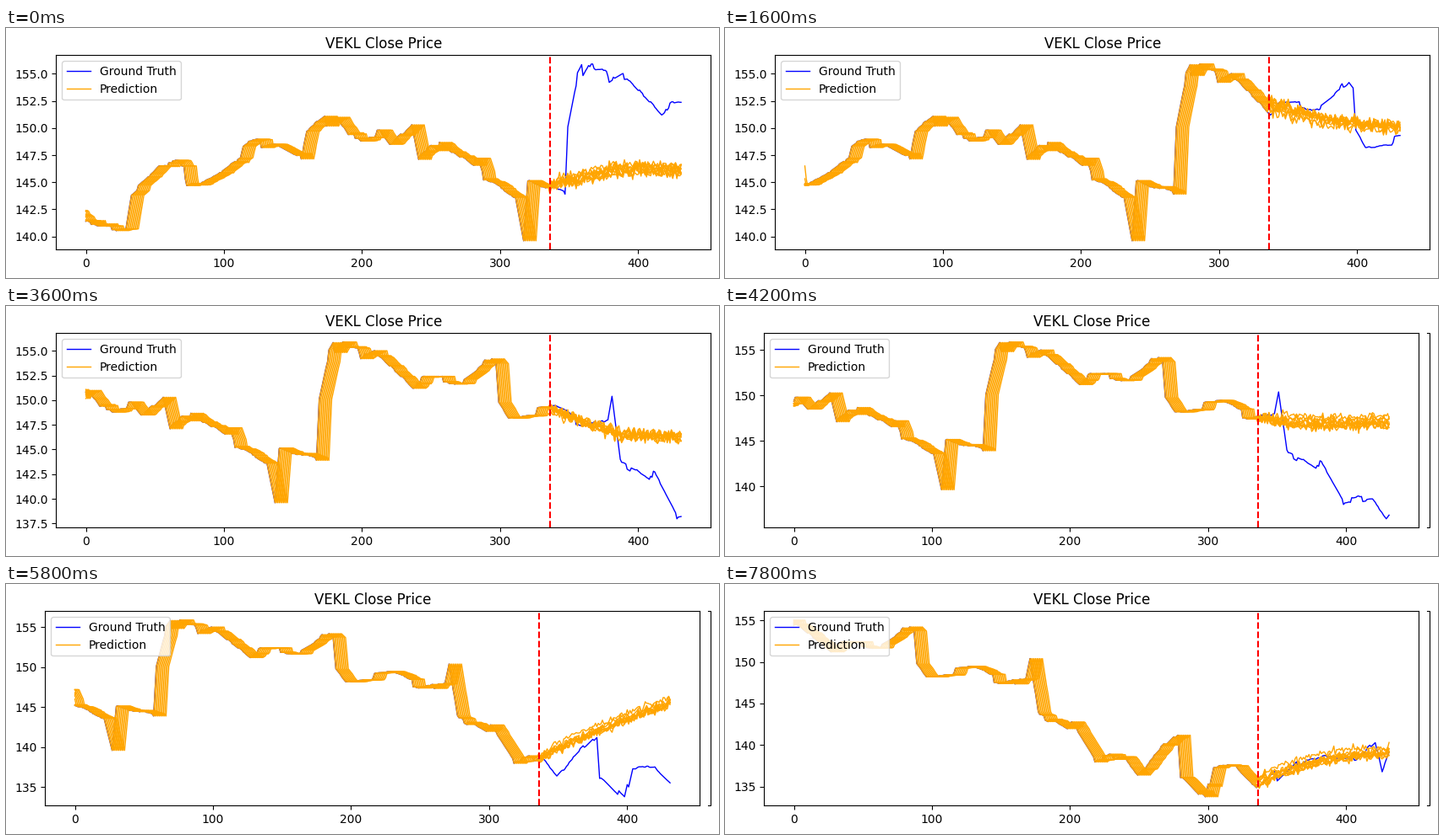
These frames come from a looping animation (844 px wide and 297 px high, 8000 ms). A matplotlib script:

```python
import numpy as np
import matplotlib.pyplot as plt
from matplotlib.animation import FuncAnimation
from matplotlib.lines import Line2D

W, H, DPI = 844, 297, 100
FRAMES, INTERVAL = 40, 200
STEP = 10                  # samples scrolled per frame, and windows drawn
PAST, AHEAD = 336, 96
LEFT, BOTTOM, WIDTH, HEIGHT = 59.3, 33.7, 775, 231
SHRINK = 13                # left shift once tick labels lose their decimals

# Main turning points of the price as (sample, value)
TURNS = np.array([
    (-9, 142.3), (8, 141.0), (29, 140.7), (33, 143.8), (53, 146.5),
    (71, 146.5), (73, 144.7), (95, 145.7), (116, 148.5), (137, 148.5),
    (155, 147.6), (160, 149.7), (182, 151.0), (190, 149.4), (213, 149.8),
    (220, 148.5), (236, 150.3), (241, 147.1), (250, 148.4), (284, 147.2),
    (288, 145.2), (311, 143.7), (317, 139.6), (320, 145.1), (347, 143.9),
    (349, 150.1), (356, 155.1), (366, 155.9), (378, 154.8), (391, 154.5),
    (417, 151.2), (424, 152.4), (454, 152.1), (474, 154.2), (477, 153.7),
    (479, 149.8), (486, 148.2), (521, 149.4), (539, 147.4), (558, 148.0),
    (561, 150.4), (567, 144.0), (591, 142.8), (607, 138.6), (629, 138.6),
    (639, 136.4), (668, 141.2), (670, 136.1), (688, 133.8), (694, 137.3),
    (711, 137.3), (725, 134.9), (761, 138.2), (797, 138.2), (811, 140.3),
    (816, 136.8), (821, 139.2),
])

# Forecast drift: final rise and mid-way bulge, eased between key frames
KEYS = [0, 8, 14, 21, 25, 33, 39]
RISE = [1.5, -2.0, -6.1, -0.4, 7.3, 6.4, 3.4]
BULGE = [0.7, -0.5, -2.5, -0.3, -2.2, 2.8, 0.9]


def market():
    """A heavy-tailed random walk pinned to the turning points."""
    t = np.arange(-STEP, STEP * FRAMES + PAST + AHEAD)
    when, value = TURNS.T
    walk = np.cumsum(0.04 * np.random.default_rng(4).normal(size=t.size) ** 3)
    pinned = walk - np.interp(t, when, np.interp(when, t, walk))
    prices = np.interp(t, when, value) + pinned
    return np.clip(prices, value.min(), value.max())


prices = market()
x = np.arange(PAST + AHEAD)
h = np.arange(AHEAD)


def price(t):
    return prices[np.asarray(t) + STEP]


def forecasts(n):
    """Ten noisy forecasts, one for each window drawn in frame n."""
    rng = np.random.default_rng(100 + n)
    u = h / AHEAD
    trend = (np.interp(n, KEYS, RISE) * u
             + np.interp(n, KEYS, BULGE) * np.sin(np.pi * u))
    last = price(STEP * n + PAST - 1 - np.arange(STEP))
    shared = rng.normal(0, 0.14, AHEAD)
    lines = []
    for value in last:
        base = last.mean() + (value - last.mean()) * np.exp(-h / 80)
        lean = rng.normal(0, 0.25) * np.minimum(1, h / 20)
        lines.append(base + trend + lean + shared + rng.normal(0, 0.18, AHEAD))
    return lines


def box(left):
    return [left / W, BOTTOM / H, WIDTH / W, HEIGHT / H]


plt.rcParams["font.family"] = "DejaVu Sans"
fig = plt.figure(figsize=(W / DPI, H / DPI), dpi=DPI)
ax = fig.add_axes(box(LEFT))
ax.set_title("VEKL Close Price")
truth, = ax.plot(x, x, color="blue", lw=1, label="Ground Truth")
bands = [ax.plot(x, x, color="orange", lw=1,
                 label="Prediction" if j == 0 else None)[0]
         for j in range(STEP)]
ax.axvline(PAST, color="red", ls="--", lw=1.5)
ax.legend(loc="upper left")
margin = 0.05 * x[-1]
ax.set_xlim(-margin, x[-1] + margin)

# Piece of the wider frame that stays visible at the right
right, top = LEFT + WIDTH, BOTTOM + HEIGHT
edge = Line2D(np.array([831, right, right, 831]) / W,
              np.array([top, top, BOTTOM, BOTTOM]) / H,
              color="black", lw=0.8, solid_joinstyle="miter",
              transform=fig.transFigure)
fig.add_artist(edge)


def draw(n):
    start = STEP * n
    curves = [price(x + start)]
    truth.set_ydata(curves[0])
    for j, (band, ahead) in enumerate(zip(bands, forecasts(n))):
        y = np.concatenate([price(x[:PAST] + start - j), ahead])
        band.set_ydata(y)
        curves.append(y)
    low, high = np.min(curves), np.max(curves)
    pad = 0.05 * (high - low)
    ax.set_ylim(low - pad, high + pad)
    narrow = high - low + 2 * pad > 20
    ax.set_position(box(LEFT - SHRINK * narrow))
    edge.set_visible(bool(narrow))
    return [truth, *bands]


anim = FuncAnimation(fig, draw, frames=FRAMES, interval=INTERVAL,
                     init_func=lambda: draw(0), repeat=True, repeat_delay=0)
plt.show()
```
